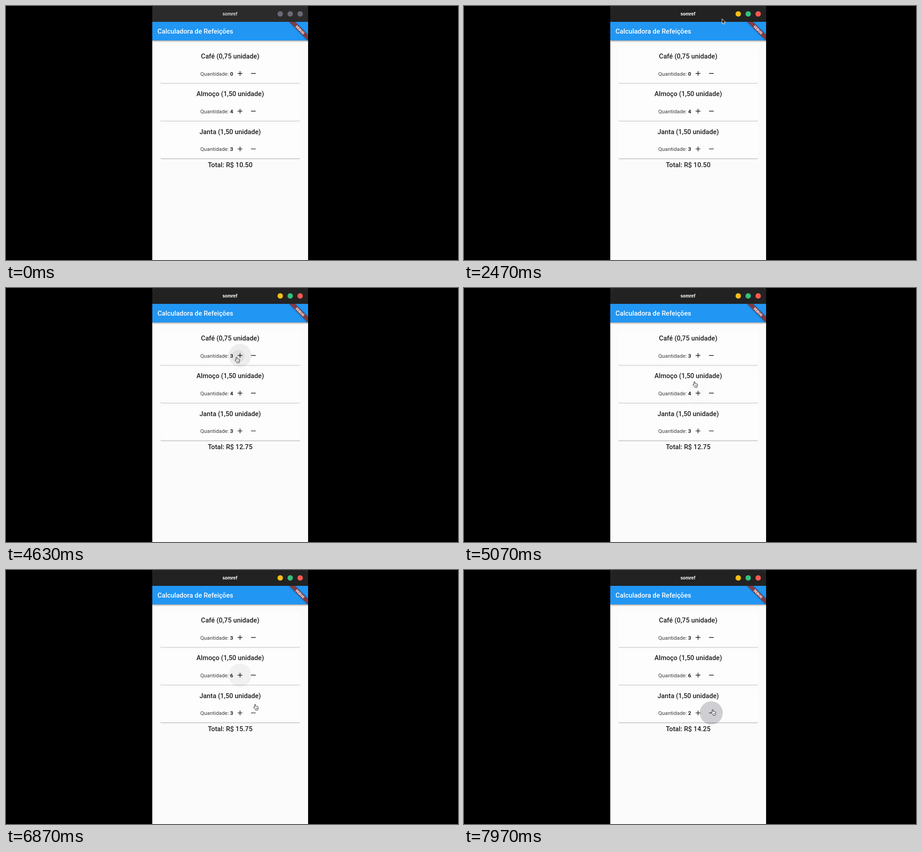
An HTML page for the animation above (8 s loop, 998 by 561 pixels).

```html
<!DOCTYPE html>
<html lang="pt-BR">
<head>
<meta charset="utf-8">
<title>Calculadora de Refeições</title>
<style>
  html, body { margin: 0; width: 100%; height: 100%; overflow: hidden; background: #000; }
  svg { display: block; width: 998px; height: 561px; }
  text { font-family: Roboto, sans-serif; fill: #1d1d1d; }
  .head { font-size: 14.7px; font-weight: 500; text-anchor: middle; }
  .label { font-size: 11.75px; fill: #3c3c3c; }
  .count { font-size: 11.75px; font-weight: 700; }
  .icon { stroke: #1d1d1d; stroke-width: 1.45; fill: none; }
</style>
</head>
<body>
<svg viewBox="0 0 998 561">
  <defs>
    <clipPath id="win"><path d="M323 561V6q0-6 6-6h332q6 0 6 6v555z"/></clipPath>
    <clipPath id="bar"><rect x="323" y="35" width="344" height="100"/></clipPath>
    <filter id="soft" x="-20%" y="-60%" width="140%" height="220%"><feGaussianBlur stdDeviation="1.6"/></filter>
    <filter id="thin" x="-5%" y="-5%" width="110%" height="110%"><feGaussianBlur stdDeviation=".7"/></filter>
  </defs>
  <g clip-path="url(#win)">
    <rect x="323" width="344" height="561" fill="#fbfbfb"/>
    <rect x="323" y="37" width="344" height="41" fill="#000" opacity=".35" filter="url(#soft)"/>
    <rect x="323" y="35" width="344" height="41" fill="#2196f3"/>
    <rect id="deco" x="323" width="344" height="35"/>
    <text id="app" x="494.5" y="20.5" text-anchor="middle" style="font:700 9.6px Inter,sans-serif;fill:#fff">somref</text>
    <g id="dots"></g>
    <text x="334.5" y="61.3" style="font-size:14.7px;font-weight:500;fill:#fff">Calculadora de Refeições</text>
    <g clip-path="url(#bar)">
      <g transform="translate(667 35) rotate(45)">
        <rect x="-29.4" y="20.6" width="58.8" height="8.8" opacity=".5" filter="url(#soft)"/>
        <rect x="-29.4" y="20.6" width="58.8" height="8.8" fill="#803c46"/>
        <text y="27.7" text-anchor="middle" style="font-size:7.5px;font-weight:900;fill:#fff">DEBUG</text>
      </g>
    </g>
    <g id="cards"></g>
    <text id="total" class="head" x="495" y="355.7"></text>
    <g id="arrow">
      <path d="M.5 .5V11.2L3 8.9 4.8 12.8 6.6 12 4.9 8.2H8.4Z" fill="#111" stroke="#fff" stroke-width="1" stroke-linejoin="round"/>
    </g>
    <g id="hand">
      <path d="M3 7.8V1.7q0-1.2 1.1-1.2t1.1 1.2v3.2q1.4-.8 2 .3 1.3-.6 1.8.5 1.9-.4 1.9 1.3v2.3q0 1.5-1 2.7v1.3H4.8v-1.2L1 8.5Q.2 7.3 1.2 6.7 2.1 6.400 3 7.800Z" fill="#fff" stroke="#222" stroke-width="1" stroke-linejoin="round"/>
      <path d="M5.900 8.300v2.500M7.500 8.300v2.500M9 8.300v2.500" stroke="#222" stroke-width=".7"/>
    </g>
  </g>
</svg>
<script>
const LOOP = 8000, PITCH = 83.3, RADIUS = 25.5;
const $ = id => document.getElementById(id);
const meals = [
  { name: 'Café', price: 0.75, start: 0 },
  { name: 'Almoço', price: 1.5, start: 4 },
  { name: 'Janta', price: 1.5, start: 3 }
];
// down = press begins, up = count changes, fade = glow begins to go
const taps = [
  { meal: 0, step: 1, down: 3730, up: 3810, fade: 3950, glow: .04 },
  { meal: 0, step: 1, down: 4130, up: 4210, fade: 4340, glow: .04 },
  { meal: 0, step: 1, down: 4540, up: 4610, fade: 4740, glow: .05 },
  { meal: 1, step: 1, down: 5870, up: 5960, fade: 6120, glow: .05 },
  { meal: 1, step: 1, down: 6270, up: 6360, fade: 6480, glow: .05 },
  { meal: 2, step: -1, down: 7530, up: 7890, fade: 8000, glow: .1 }
];
const hovers = [
  { meal: 0, x: 516.7, from: 2840, to: 4920 },
  { meal: 1, x: 516.7, from: 5060, to: 6880 },
  { meal: 2, x: 546, from: 7100, to: 8100 }
];
// time, x, y
const arrowIn = [[30, 640, 11], [100, 500, 160], [160, 369, 290], [210, 400, 340], [270, 450, 265],
  [1500, 450, 265], [1600, 490, 200], [1720, 580, 90], [1870, 648, -16]];
const arrowBack = [[2170, 640, -16], [2330, 612, 8], [2470, 569.5, 27.5], [2650, 528, 90], [2800, 510, 143]];
const handPath = [[2800, 507, 145], [2900, 505, 152], [4840, 505, 152], [4960, 504, 180], [5130, 505, 220],
  [6680, 505, 220], [6780, 532, 270], [6870, 546, 296], [7100, 547, 305], [7370, 545, 307.5], [8000, 545, 307.5]];

const clamp = v => Math.max(0, Math.min(1, v));
const ramp = (t, from, span) => clamp((t - from) / span);
const mix = (a, b, k) => a + (b - a) * k;
const blend = (a, b, k) => `rgb(${a.map((v, i) => Math.round(mix(v, b[i], k)))})`;

function along(path, t) {
  let i = 1;
  while (i < path.length - 1 && path[i][0] < t) i++;
  const [t0, x0, y0] = path[i - 1], [t1, x1, y1] = path[i];
  const k = ramp(t, t0, t1 - t0);
  return [mix(x0, x1, k), mix(y0, y1, k)];
}

const lights = [[247, 190, 24], [54, 190, 126], [244, 89, 78]];
$('dots').innerHTML = lights.map((_, i) => `<circle cx="${605.5 + i * 22}" cy="17.5" r="6"/>`).join('');
const dots = [...$('dots').children];

$('cards').innerHTML = meals.map((m, i) => {
  const price = m.price.toFixed(2).replace('.', ',');
  return `<g transform="translate(0 ${i * PITCH})">
    <rect x="341" y="94.500" width="308" height="76.800" rx="3" opacity=".35" filter="url(#thin)"/>
    <rect x="341" y="93.700" width="308" height="76.800" rx="3" fill="#fdfdfd"/>
    <text class="head" x="495" y="116">${m.name} (${price} unidade)</text></g>`;
}).join('') + hovers.map(h => {
  const y = 149 + h.meal * PITCH;
  return `<circle class="halo" cx="${h.x}" cy="${y}" r="${RADIUS}" fill="#101020"/>`;
}).join('') + taps.map(() => '<circle class="ripple" fill="#101020"/>').join('') +
meals.map((m, i) => `<g transform="translate(0 ${i * PITCH})">
    <text class="label" x="429" y="153.800">Quantidade:</text>
    <text class="count" x="494.800" y="153.800"></text>
    <path class="icon" d="M511.500 149h10.400M516.700 143.800v10.400M541 149h10.400"/></g>`).join('');
const halos = [...document.querySelectorAll('.halo')];
const ripples = [...document.querySelectorAll('.ripple')];
const counts = [...document.querySelectorAll('.count')];

function place(el, pos, shown) {
  el.style.display = shown ? '' : 'none';
  el.setAttribute('transform', `translate(${pos})`);
}

function draw(t) {
  const focus = ramp(t, 2170, 200);
  $('deco').setAttribute('fill', blend([43, 43, 43], [34, 34, 34], focus));
  $('app').style.opacity = mix(.8, 1, focus);
  dots.forEach((d, i) => d.setAttribute('fill', blend([106, 105, 117], lights[i], focus)));

  const qty = meals.map(m => m.start);
  taps.forEach(p => { if (t >= p.up) qty[p.meal] += p.step; });
  counts.forEach((c, i) => c.textContent = qty[i]);
  $('total').textContent = 'Total: R$ ' + meals.reduce((s, m, i) => s + m.price * qty[i], 0).toFixed(2);

  halos.forEach((el, i) => {
    const h = hovers[i];
    let glow = .048 * ramp(t, h.from, 60) * (1 - ramp(t, h.to, 60));
    taps.forEach(p => {
      if (p.meal === h.meal) glow += p.glow * .5 * ramp(t, p.down, 120) * (1 - ramp(t, p.fade, 200));
    });
    el.style.opacity = glow;
  });
  ripples.forEach((el, i) => {
    const p = taps[i], h = hovers[p.meal];
    const grow = ramp(t, p.down, p.step < 0 ? 400 : 200);
    const [x, y] = along(handPath, p.down);
    el.setAttribute('cx', mix(x + 4, h.x, grow));
    el.setAttribute('cy', mix(y, 149 + p.meal * PITCH, grow));
    el.setAttribute('r', mix(5, RADIUS, grow));
    el.style.opacity = p.glow * ramp(t, p.down, 75) * (1 - ramp(t, p.fade, 200));
  });

  place($('arrow'), along(t < 2000 ? arrowIn : arrowBack, t), t >= 30 && t < 2800);
  place($('hand'), along(handPath, t), t >= 2800);
}

const begin = performance.now();
function tick() {
  draw((performance.now() - begin) % LOOP);
  requestAnimationFrame(tick);
}
tick();
</script>
</body>
</html>
```
